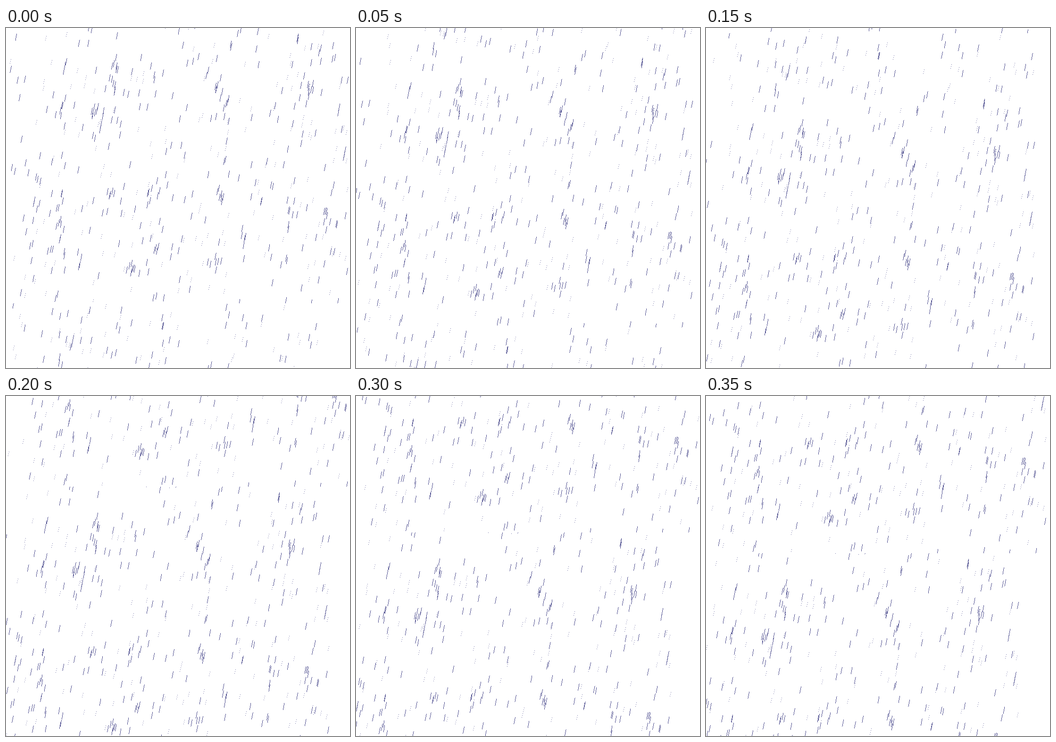
These frames come from a looping animation (729 px wide and 720 px high, 400 ms). An HTML page with a canvas:

```html
<!DOCTYPE html>
<html lang="en">
<head>
<meta charset="utf-8">
<title>Rain</title>
<style>
  html, body { margin: 0; width: 100%; height: 100%; overflow: hidden; background: #fff; }
  canvas { display: block; }
</style>
</head>
<body>
<canvas id="stage" width="729" height="720"></canvas>
<script>
const STEP = 50, STEPS = 8;
const LEFT = -10, TOP = -127, WIDTH = 742, HEIGHT = 710, BOTTOM = TOP + HEIGHT;
const LEAN = 63;

// Key points of the fall: step, x, y. Steps between them are interpolated.
const fall = [[0, 0, 0], [1, -12, 51], [3, -29, 138], [5, -51, 245], [7, -63, 333]];

// Places where drops gather.
const clumps = [
  [228, 75], [230, 131], [445, 130], [466, 160], [641, 135], [183, 182],
  [116, 185], [225, 345], [300, 350], [116, 415], [65, 383], [452, 358],
  [679, 388], [317, 465], [267, 510], [444, 495], [503, 460], [607, 395]
];

function seeded(seed) {
  return () => {
    seed = (seed + 0x6d2b79f5) | 0;
    let n = Math.imul(seed ^ (seed >>> 15), seed | 1);
    n ^= n + Math.imul(n ^ (n >>> 7), n | 61);
    return ((n ^ (n >>> 14)) >>> 0) / 4294967296;
  };
}

function makeSheet() {
  const sheet = document.createElement('canvas');
  sheet.width = WIDTH;
  sheet.height = HEIGHT;
  const pen = sheet.getContext('2d');
  const random = seeded(41);
  const spread = size => (random() + random() - 1) * size;

  const dot = (x, y) => pen.fillRect(Math.round(x) - LEFT, Math.round(y) - TOP, 1, 1);
  const streak = (x, y, length = 15) => {
    for (let i = 0; i < length; i++) {
      const d = i - length / 2;
      dot(x - d * 0.19, y + d);
    }
  };
  const speck = (x, y) => {
    for (let i = -1; i <= 1; i++) dot(x - i, y + i * 4);
  };
  const scatter = (count, draw) => {
    for (let i = 0; i < count; i++) {
      draw(LEFT + random() * 736, TOP + random() * HEIGHT);
    }
  };

  pen.fillStyle = '#fff';
  pen.fillRect(0, 0, WIDTH, HEIGHT);
  pen.fillStyle = '#505090';
  for (const [x, y] of clumps) {
    streak(x, y);
    for (let i = 0; i < 4; i++) streak(x + spread(16), y + spread(34));
  }
  scatter(290, (x, y) => streak(x, y));
  scatter(5, (x, y) => streak(x, y, 27));
  scatter(190, speck);
  return sheet;
}

function fallAt(step) {
  const next = Math.max(1, fall.findIndex(([s]) => s >= step));
  const [s0, x0, y0] = fall[next - 1];
  const [s1, x1, y1] = fall[next];
  const part = (step - s0) / (s1 - s0);
  return [Math.round(x0 + (x1 - x0) * part), Math.round(y0 + (y1 - y0) * part)];
}

const view = document.getElementById('stage').getContext('2d');
const sheet = makeSheet();
const place = (x, y) => view.drawImage(sheet, x + LEFT, y + TOP);

const start = performance.now();
function frame() {
  const elapsed = Math.max(0, performance.now() - start);
  const step = Math.floor(elapsed / STEP) % STEPS;
  const [x, y] = fallAt(step);
  view.fillStyle = '#fff';
  view.fillRect(0, 0, 729, 720);
  place(x - LEAN, y + HEIGHT);
  place(x, y);
  // In the second half the sheet above overlaps the main one.
  if (step < STEPS / 2) place(x + LEAN, y - HEIGHT);
  else place(x + LEAN - 4, y - BOTTOM);
  requestAnimationFrame(frame);
}
frame();
</script>
</body>
</html>
```
